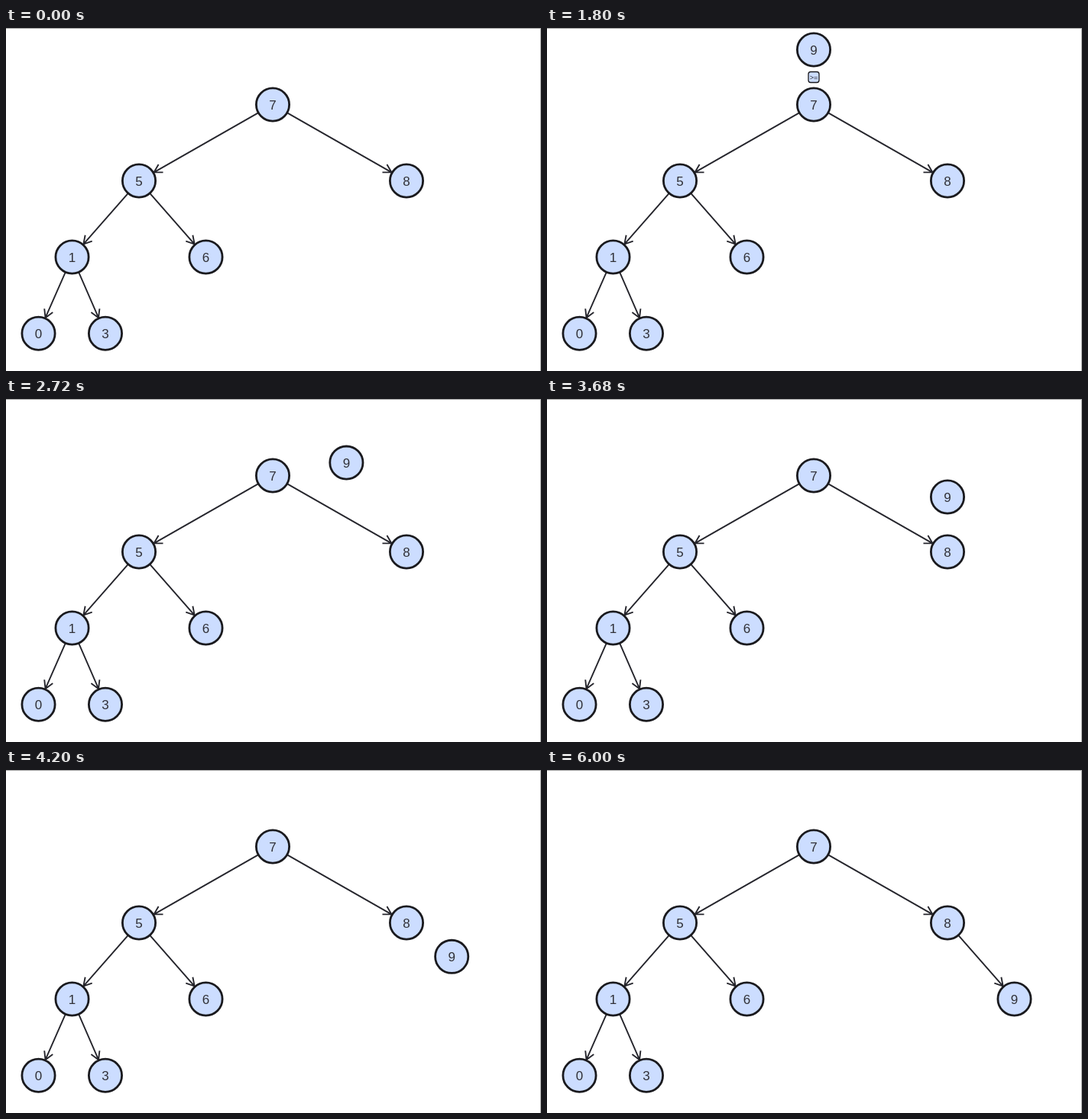
An HTML page with a canvas for the animation above (6.04 s loop, 700 by 450 pixels).

```html
<!DOCTYPE html>
<html lang="en">
<head>
<meta charset="utf-8">
<title>Binary search tree insertion</title>
<style>
  html, body { margin: 0; width: 100%; height: 100%; overflow: hidden; background: #fff; }
  canvas { display: block; width: 700px; height: 450px; }
</style>
</head>
<body>
<canvas id="stage" width="700" height="450"></canvas>
<script>
const ctx = document.getElementById("stage").getContext("2d");
const LOOP = 6040;
const FILL = "#ccddff";
const INK = "#1a1a1e";
const FONT = "'Liberation Sans', Arial, sans-serif";

const nodes = {
  7: [349, 100.5],
  5: [174, 200.5], 8: [524, 200.5],
  1: [86.5, 300.5], 6: [261.5, 300.5],
  0: [42.5, 400.8], 3: [130, 400.8]
};
const edges = [[7, 5], [7, 8], [5, 1], [5, 6], [1, 0], [1, 3]];

// Resting places of the inserted node
const aboveRoot = [349, 28.5];
const aboveRight = [524, 128.5];
const leaf = [611.5, 300.5];

const clamp = v => Math.min(1, Math.max(0, v));
const mix = (a, b, p) => a.map((v, i) => v + (b[i] - v) * p);

function drawText(text, x, baseline, size) {
  ctx.font = `${size}px ${FONT}`;
  ctx.textAlign = "center";
  ctx.fillStyle = "#303036";
  ctx.fillText(text, x, baseline);
}

function drawNode(label, [x, y]) {
  ctx.beginPath();
  ctx.arc(x, y, 21.6, 0, Math.PI * 2);
  ctx.fillStyle = FILL;
  ctx.fill();
  ctx.lineWidth = 2.8;
  ctx.strokeStyle = INK;
  ctx.stroke();
  drawText(label, x, y + 6, 17);
}

function drawArrow(from, to) {
  const angle = Math.atan2(to[1] - from[1], to[0] - from[0]);
  const along = ([x, y], a, d) => [x + Math.cos(a) * d, y + Math.sin(a) * d];
  const tip = along(to, angle, -22.5);
  ctx.beginPath();
  ctx.moveTo(...along(from, angle, 22));
  ctx.lineTo(...tip);
  ctx.moveTo(...along(tip, angle - Math.PI / 6, -12));
  ctx.lineTo(...tip);
  ctx.lineTo(...along(tip, angle + Math.PI / 6, -12));
  ctx.lineWidth = 1.9;
  ctx.strokeStyle = "#25252c";
  ctx.stroke();
}

function drawComparison(x, y) {
  ctx.beginPath();
  ctx.roundRect(x - 7, y - 7, 14, 14, 3);
  ctx.fillStyle = FILL;
  ctx.fill();
  ctx.lineWidth = 1.3;
  ctx.strokeStyle = INK;
  ctx.stroke();
  drawText(">=", x, y + 3, 9);
}

function drawBorder() {
  ctx.fillStyle = "#a6a6a6";
  ctx.fillRect(0, 0, 700, 1);
  ctx.fillRect(699, 0, 1, 450);
}

function insertedPosition(t) {
  if (t < 3700) return mix(aboveRoot, aboveRight, clamp((t - 2331) / 708));
  return mix(aboveRight, leaf, clamp((t - 3722) / 708));
}

function render(t) {
  ctx.fillStyle = "#fff";
  ctx.fillRect(0, 0, 700, 450);
  drawBorder();
  for (const [a, b] of edges) drawArrow(nodes[a], nodes[b]);
  if (t >= 4440) drawArrow(nodes[8], leaf);
  for (const label in nodes) drawNode(label, nodes[label]);
  if (t >= 1000) drawNode("9", insertedPosition(t));
  if (t >= 1640 && t < 2280) drawComparison(349, 64.5);
  if (t >= 3080 && t < 3680) drawComparison(524, 164.5);
}

const start = performance.now();
function tick() {
  render((performance.now() - start) % LOOP);
  requestAnimationFrame(tick);
}
tick();
</script>
</body>
</html>
```
